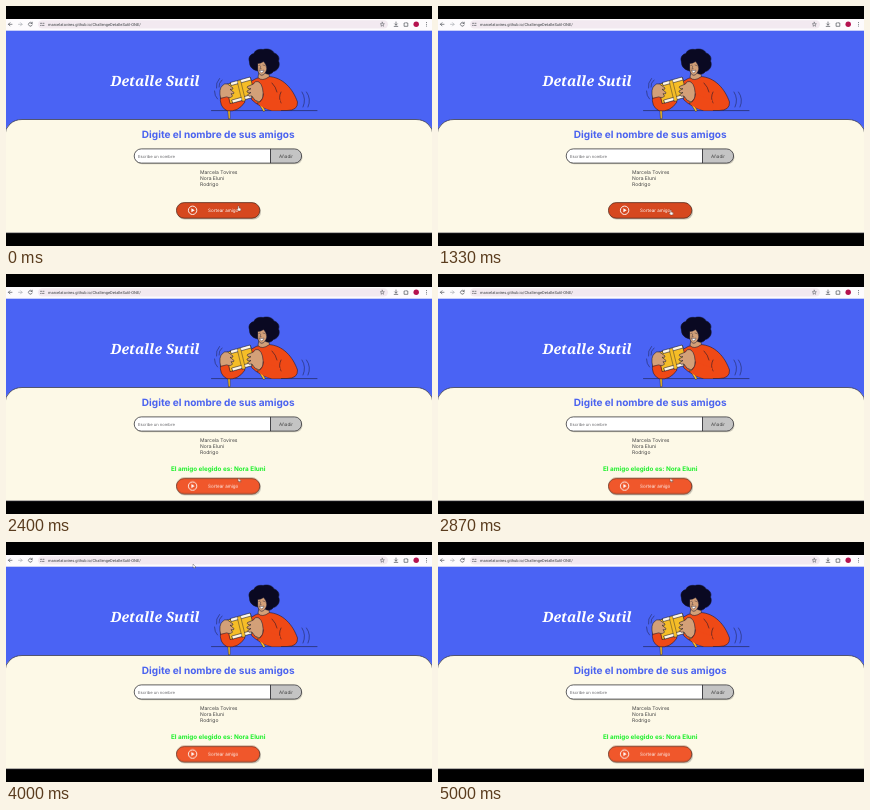
An HTML page for the animation above (5.07 s loop, 426 by 240 pixels).

```html
<!DOCTYPE html>
<html lang="es">
<head>
<meta charset="utf-8">
<title>Sorteo</title>
<style>
html, body { margin: 0; width: 100%; height: 100%; overflow: hidden; background: #000; }
svg { display: block; width: 100vw; height: 100vh; text-rendering: geometricPrecision; }
text { font-family: Inter, sans-serif; }
.mid { text-anchor: middle; }
.title { font: italic 700 14.2px "Noto Serif", serif; fill: #fff; }
.url { font: 4px Roboto, sans-serif; fill: #3c4043; }
.icon { fill: none; stroke: #50545a; stroke-width: .7; stroke-linecap: round; stroke-linejoin: round; }
.ink { stroke: #15152c; stroke-width: .55; stroke-linecap: round; stroke-linejoin: round; }
.line { fill: none; }
.skin { fill: #d3a078; }
.coat { fill: #ef4916; }
.box { fill: #f5bd27; }
</style>
</head>
<body>
<svg viewBox="0 0 426 240" preserveAspectRatio="none">
  <rect width="426" height="240" fill="#000"/>
  <rect y="24" width="426" height="203" fill="#4a63f4"/>
  <path d="M-1 227V129A17 15.500 0 0 1 16 113.500H410A17 15.500 0 0 1 427 129V227Z" fill="#fdf9e7" stroke="#30303c" stroke-width=".7"/>

  <g id="toolbar">
    <rect y="13" width="426" height="11.700" fill="#fdfbfd"/>
    <rect x="32" y="14.200" width="350" height="8.300" rx="4.150" fill="#f2e9f0"/>
    <g class="icon">
      <path d="M6 18.300H2.500M4 16.700L2.400 18.300L4 19.900"/>
      <path d="M12.500 18.300H16M14.500 16.700L16.100 18.300L14.500 19.900" stroke="#aaadb2"/>
      <path d="M26 17.200A1.900 1.900 0 1 0 26.200 19M26.200 16.200V17.500H24.900"/>
      <path d="M34.500 17.300H36M37.300 17.300H38M34.500 19.400H35.200M36.500 19.400H38"/>
      <path d="M376.300 16.200L376.900 17.700L378.400 17.800L377.200 18.800L377.600 20.300L376.300 19.500L375 20.300L375.400 18.800L374.200 17.800L375.700 17.700Z" stroke-width=".5"/>
      <path d="M390 16V19M388.700 17.900L390 19.200L391.300 17.900M388.200 20.400H391.800"/>
      <path d="M398.500 17H399.500Q400 15.800 400.700 17H401.800V20.300H398.500Z"/>
      <path d="M420.500 16.500V16.510M420.500 18.300V18.310M420.500 20.100V20.110" stroke-width=".9"/>
    </g>
    <circle cx="410.200" cy="18.300" r="2.700" fill="#b5124f"/>
    <text class="url" x="42" y="19.700">marcelatovires.github.io/ChallengeDetalleSutil-ONE/</text>
  </g>

  <text class="title mid" x="149" y="79.800">Detalle Sutil</text>

  <g id="scene" class="ink">
    <path class="line" d="M205.500 104.600H311"/>
    <path class="coat" d="M241 79Q249 70 262 70.500C277 71 287 83 291.500 96Q292 104.500 281 104.500H266Q253 101 246 94Z"/>
    <path class="skin" d="M253 65L252 71.500Q256 76 263.500 70.500L262 64Z"/>
    <path d="M243.500 56C241.500 51 245 48 248 47.500C249 43.500 254 43 257 43.500C262 42 267 44 268 47C272 48 274 52 272.500 55C275 60 271 65 267.500 65.500C264 70 259 68 257 65C249 66 243 62 243.500 56Z" fill="#0a0922"/>
    <path class="skin" d="M251.800 57.500Q255 57.500 257.500 55.500Q260.500 58 260.800 63Q259.500 68.500 255.800 69.300Q252.300 68.500 251.800 64Z"/>
    <path class="line" d="M252.800 59.500L254 59.200M257 59L258.700 59.500M254.700 60.200L254 62.800H255.200" stroke-width=".4"/>
    <path d="M253.700 64.300Q256 65 258 64.100Q257.300 66.800 255.500 66.800Q254 66.500 253.700 64.300Z" fill="#fff" stroke-width=".35"/>
    <path class="line" d="M266 77Q270 81 271 86M275 86Q272 92 275 97"/>
    <path class="box" d="M221.300 97L222.500 113L224.200 112.500L224 97ZM249 92L257.500 105.500L259.300 104.500L251.500 91Z" stroke-width=".4"/>
    <path class="coat" d="M214.500 90Q213 101 221 104.700Q232 106.500 239 96L236 91Z"/>
    <path class="box" d="M220 78.500L244.500 71.500L249 90.500L224.500 97.500Z"/>
    <path d="M224.500 76.500L244 71L245 74L225.500 79.500Z" fill="#fff7e7"/>
    <path d="M226 94L245 88.700L245.800 91.700L227 97Z" fill="#fff7e7"/>
    <path class="box" d="M231.500 75L234.500 74.200L239.500 94.500L236.500 95.400Z" stroke-width=".4"/>
    <path class="skin" d="M214.500 92Q212.500 83 216.500 79.500Q218.500 77 221.500 78L227 82Q227.500 84 224 83.300L228 86.500Q228.500 88.500 225 87.700L226.500 90Q225 92.500 221 91Z"/>
    <path class="skin" d="M257 92Q258 80 253 76Q249 74.500 247.500 78L241.500 80.500Q240.500 83 245 82.700L241 85Q240.500 87.500 245 86.500L241.500 88.800Q242 91 246 90Q248 95 253 96Z"/>
    <path class="coat" d="M251.500 97.500Q257 95 257.500 88L274 94L275 104.500H266Q257 102.500 251.500 97.500Z" stroke="none"/>
    <path class="line" d="M251.500 97.500Q257 95 257.500 88"/>
    <path class="line" d="M213.500 72.500Q209.500 77 210.500 82M216 74Q212.500 77 213 81M208.500 85Q208.500 90 211.500 93M296 86Q300.500 93 297 101M300.500 86Q305.500 93 302 101" stroke-width=".45"/>
  </g>

  <text class="mid" x="212.200" y="132" font-size="10.050" font-weight="700" fill="#4b63ef">Digite el nombre de sus amigos</text>

  <g id="form" stroke="#2b2b30" stroke-width=".75">
    <rect x="129" y="144" width="167.500" height="14.200" rx="7" fill="#8d8a80" stroke="none" opacity=".4"/>
    <path d="M264.500 142.900H135.300A7.100 7.100 0 0 0 135.300 157.100H264.500Z" fill="#fff"/>
    <path d="M264.500 142.900H288.500A7.100 7.100 0 0 1 288.500 157.100H264.500Z" fill="#c4c4c4"/>
  </g>
  <text x="132" y="151.500" font-size="4.150" fill="#68686c">Escribe un nombre</text>
  <text class="mid" x="280" y="151.600" font-size="4.600" fill="#444">Añadir</text>

  <g font-size="5" fill="#444">
    <text x="194" y="168">Marcela Tovires</text>
    <text x="194" y="174">Nora Eluni</text>
    <text x="194" y="180">Rodrigo</text>
  </g>

  <text id="result" class="mid" x="212.200" y="196.900" font-size="6.350" font-weight="700" fill="#1cf02a" opacity="0">El amigo elegido es: Nora Eluni</text>

  <g id="draw">
    <rect x="171" y="198" width="84" height="15.400" rx="7.700" fill="#8d8a80" opacity=".5"/>
    <rect id="face" x="170.400" y="196.600" width="83.400" height="15.600" rx="7.800" fill="#d6481f" stroke="#4a2418" stroke-width=".7"/>
    <circle cx="186.600" cy="204.300" r="4.200" fill="none" stroke="#fff" stroke-width=".9"/>
    <path d="M185.400 202.300L188.700 204.300L185.400 206.300Z" fill="#fff"/>
    <text class="mid" x="217.200" y="205.900" font-size="4.550" fill="#fff">Sortear amigo</text>
  </g>

  <g id="cursor" stroke="#222" stroke-width=".3" stroke-linejoin="round" fill="#fff">
    <path id="hand" d="M-.1 .2Q.5-.4 1 .2V2L2.500 2.400Q3 2.700 2.800 3.600L2.400 5H.3L-1.200 3Q-.9 2.300-.1 3Z"/>
    <path id="arrow" d="M0 0V4L1 3.100L1.700 4.600L2.400 4.200L1.700 2.900H2.900Z" opacity="0"/>
  </g>
  <rect width="426" height="13" fill="#000"/>
</svg>
<script>
const LOOP = 5070, REVEAL = 1500;

// Each step: [time in ms, styles, easing towards the next step]
function play(id, steps) {
  const frames = steps.map(([at, style, easing = "linear"]) => ({ offset: at / LOOP, easing, ...style }));
  const move = document.getElementById(id).animate(frames, { duration: LOOP, iterations: Infinity });
  move.startTime = document.timeline.currentTime;
}

const swap = (id, before, after) =>
  play(id, [[0, before, "step-end"], [REVEAL, after, "step-end"], [LOOP, after]]);
const at = (x, y) => ({ transform: `translate(${x}px, ${y}px)` });

swap("result", { opacity: 0 }, { opacity: 1 });
swap("draw", at(0, 0), at(0, 7.7));
swap("face", { fill: "#d6481f" }, { fill: "#f0572b" });
swap("hand", { opacity: 1 }, { opacity: 0 });
swap("arrow", { opacity: 0 }, { opacity: 1 });

play("cursor", [
  [0, at(232, 199), "ease-out"],
  [470, at(232.3, 204)],
  [3200, at(232.3, 204), "ease-in-out"],
  [3900, at(187, 22)],
  [4130, at(187, 22), "ease-in"],
  [4700, at(189, 6)],
  [LOOP, at(189, 6)]
]);
</script>
</body>
</html>
```
